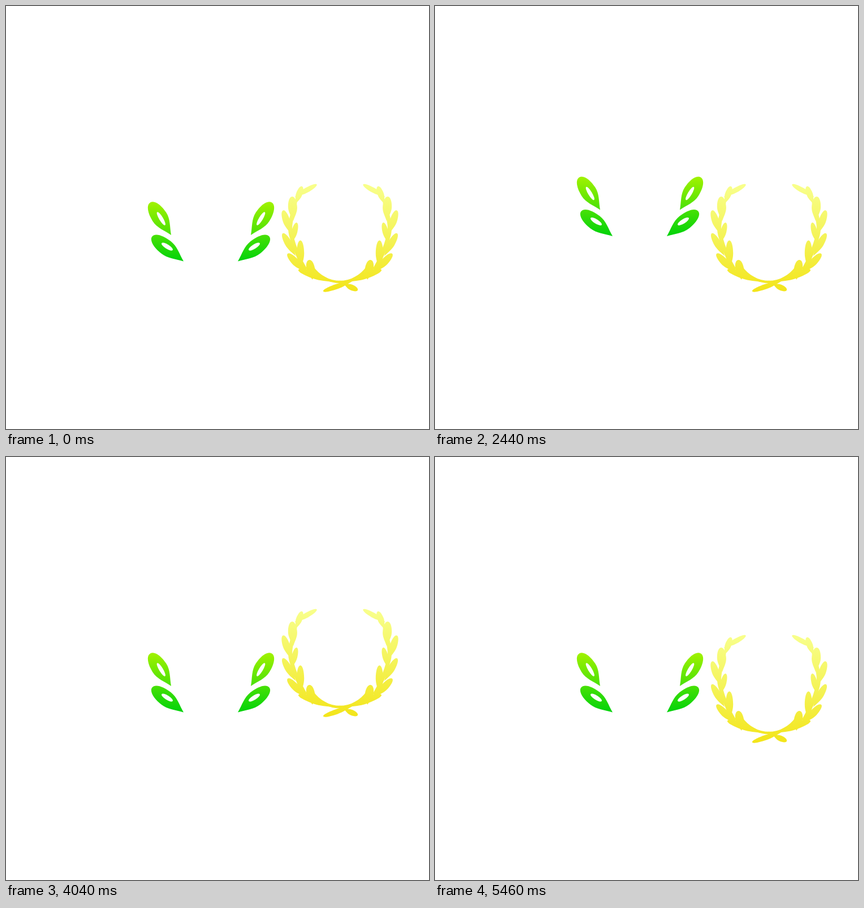
Write an HTML page that moves like this. It is 748 px wide and 748 px high and loops after 5480 ms.

```html
<!DOCTYPE html>
<html>
<head>
<meta charset="utf-8">
<style>
html, body { margin: 0; width: 100%; height: 100%; overflow: hidden; background: #fff; }
svg { display: block; width: 100vw; height: 100vh; }
</style>
</head>
<body>
<svg viewBox="0 0 748 748">
  <defs>
    <linearGradient id="green" gradientUnits="userSpaceOnUse" x1="0" y1="347" x2="0" y2="452">
      <stop offset="0" stop-color="#a0f200"/>
      <stop offset="1" stop-color="#00d20a"/>
    </linearGradient>
    <linearGradient id="gold" gradientUnits="userSpaceOnUse" x1="0" y1="314" x2="0" y2="505">
      <stop offset="0" stop-color="#f8ff8c"/>
      <stop offset=".5" stop-color="#f4f357"/>
      <stop offset="1" stop-color="#f3e51a"/>
    </linearGradient>
    <g id="upper">
      <path id="upperLeaf" fill="url(#green)"/>
      <ellipse rx="13.5" ry="3.5" transform="translate(274.3 376) rotate(59)" fill="#fff"/>
    </g>
    <g id="lower">
      <path id="lowerLeaf" fill="url(#green)"/>
      <ellipse rx="11.5" ry="3.9" transform="translate(285 425.5) rotate(32)" fill="#fff"/>
    </g>
    <g id="branch">
      <path id="foliage" fill="url(#gold)"/>
      <g fill="none" stroke="url(#gold)" stroke-linecap="round">
        <path d="M511 348C505 375 500 390 504 405S514 440 528 464" stroke-width="7"/>
        <path d="M541 461C552 476 568 488 591 488" stroke-width="4.500"/>
      </g>
    </g>
  </defs>
  <g id="leaves">
    <use href="#upper"/>
    <use href="#lower"/>
    <use href="#upper" transform="translate(725 0) scale(-1 1)"/>
    <use href="#lower" transform="translate(724 0) scale(-1 1)"/>
  </g>
  <g id="wreath">
    <use href="#branch"/>
    <use href="#branch" transform="translate(1181 0) scale(-1 1)"/>
    <path id="stem" fill="url(#gold)"/>
  </g>
</svg>
<script>
const LOOP = 5480, DROP = 1000, PEAK = 720, HOLD = 320;
const HIGH = -46.6, LOW = 8.6;
const $ = id => document.getElementById(id);

// Teardrop from a pointed base to a round tip
function leaf(bx, by, tx, ty, half) {
  const dx = tx - bx, dy = ty - by, len = Math.hypot(dx, dy);
  const at = (u, w) => {
    const k = w * half / len;
    return `${(bx + u * dx - k * dy).toFixed(2)} ${(by + u * dy + k * dx).toFixed(2)} `;
  };
  return "M" + at(0, 0) +
    "C" + at(.2, .4) + at(.35, 1) + at(.56, 1) +
    "C" + at(.78, 1) + at(1, .65) + at(1, 0) +
    "C" + at(1, -.65) + at(.78, -1) + at(.56, -1) +
    "C" + at(.35, -1) + at(.2, -.4) + at(0, 0) + "Z";
}

const setPath = (id, ...parts) => $(id).setAttribute("d", parts.join(""));

setPath("upperLeaf", leaf(292, 405, 255, 347.5, 14.2));
setPath("lowerLeaf", leaf(314, 451.5, 258.5, 407.5, 13.7));
setPath("foliage",
  leaf(510, 338, 549.5, 315.5, 4.5),
  leaf(512, 350, 523.5, 319, 5.5),
  leaf(508, 380, 506, 337, 8),
  leaf(503, 402, 490, 361.5, 6.3),
  leaf(505, 420, 514, 383, 5.2),
  leaf(512, 442, 489.5, 402, 6.2),
  leaf(521, 466, 520.5, 414.5, 6.5),
  leaf(528, 470, 498, 438, 6.3),
  leaf(542, 484, 536, 449, 7.5),
  leaf(580, 488.5, 517, 466.5, 6)
);
setPath("stem",
  leaf(614, 486, 561, 504.5, 4.5),
  leaf(597, 491.5, 622, 502.5, 5)
);

// Symmetric-height cubic-bezier(x1, 0, x2, 1)
function ease(x, x1, x2) {
  let lo = 0, hi = 1;
  for (let i = 0; i < 24; i++) {
    const s = (lo + hi) / 2, r = 1 - s;
    if (3 * r * r * s * x1 + 3 * r * s * s * x2 + s ** 3 < x) lo = s; else hi = s;
  }
  return lo * lo * (3 - 2 * lo);
}

// Drop below the rest line, then settle on it
function fall(ms) {
  if (ms <= 0) return HIGH;
  if (ms >= DROP) return 0;
  if (ms < PEAK) return HIGH + (LOW - HIGH) * ease(ms / PEAK, .79, .17);
  return LOW * (1 - ((ms - PEAK) / (DROP - PEAK)) ** 2);
}

// The rise is the drop played backwards around the middle of the hold
const bounce = (t, mid) => fall(Math.abs(t - mid) - HOLD / 2);

const lift = (id, y) => $(id).setAttribute("transform", `translate(0 ${y.toFixed(2)})`);

function draw(now) {
  const t = now % LOOP;
  lift("leaves", bounce(t, 2760));
  lift("wreath", bounce(t, 4300));
}

let start;
function tick(now) {
  start ??= now;
  draw(now - start);
  requestAnimationFrame(tick);
}
draw(0);
requestAnimationFrame(tick);
</script>
</body>
</html>
```
